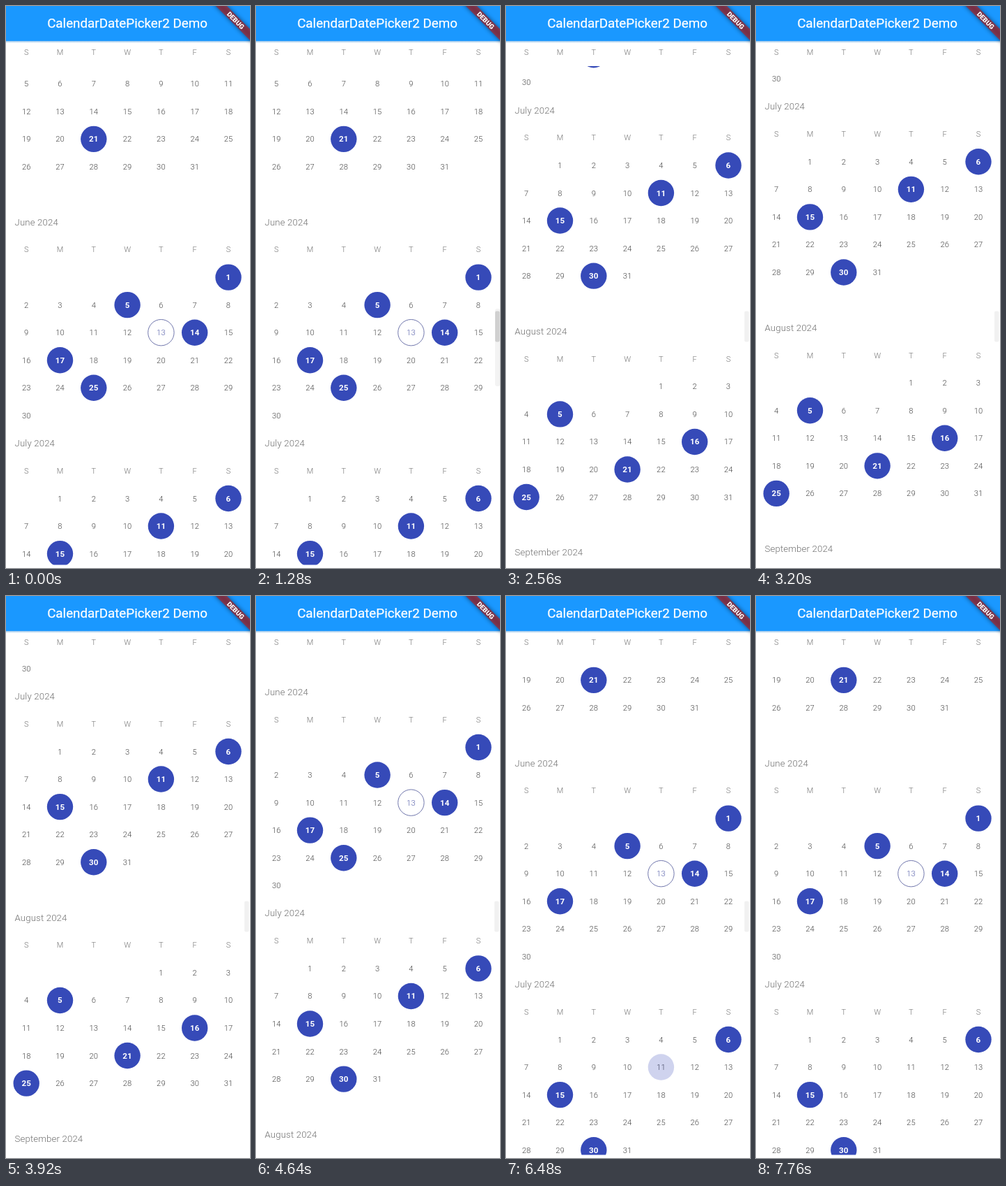
These frames come from a looping animation (350x804 px, 8000 ms). An HTML page:

```html
<!DOCTYPE html>
<html lang="en">
<head>
<meta charset="utf-8">
<title>Calendar</title>
<style>
  html, body { margin: 0; width: 100%; height: 100%; overflow: hidden; background: #fff; }
  svg { display: block; width: 100%; height: 100%; font-family: Roboto, sans-serif; }
  .title { font-size: 18.8px; fill: #fff; stroke: #fff; stroke-width: .25px; }
  .month { font-size: 13.2px; font-weight: 300; letter-spacing: .15px; fill: #707070; }
  .week { font-size: 11px; font-weight: 300; fill: #777; }
  .day text { font-size: 11.2px; font-weight: 300; letter-spacing: .1px; fill: #484848; }
  .day circle { fill: none; }
  .today circle { stroke: #7076ac; }
  .today text { fill: #5c65ad; }
  .on circle { fill: #364ab8; }
  .on text { font-size: 11.6px; font-weight: 700; fill: #fff; }
  .mid { text-anchor: middle; }
  .debug { font-size: 9.6px; font-weight: 900; fill: #fff; }
</style>
</head>
<body>
<svg viewBox="0 0 350 804" preserveAspectRatio="xMidYMid meet">
  <defs>
    <clipPath id="view"><rect y="86" width="350" height="713.5"/></clipPath>
    <linearGradient id="fade" x2="0" y2="1">
      <stop stop-color="#8fbfe8"/><stop offset="1" stop-color="#fff"/>
    </linearGradient>
    <filter id="soft" x="-20%" y="-150%" width="140%" height="400%"><feGaussianBlur stdDeviation="3"/></filter>
  </defs>
  <rect width="350" height="804" fill="#fff"/>
  <g clip-path="url(#view)"><g id="list"></g></g>
  <g id="sticky"></g>
  <g id="bar">
    <rect id="track" x="343" y="433" width="7" height="111" rx="3" fill="#f3f3f3"/>
    <rect id="thumb" x="342" y="436.5" width="6.5" height="44" rx="2" fill="#f1f1f1"/>
  </g>
  <rect y="50" width="350" height="3" fill="url(#fade)"/>
  <rect width="350" height="50" fill="#1a98ff"/>
  <text class="title mid" x="174" y="31.2">CalendarDatePicker2 Demo</text>
  <g transform="translate(350 0) rotate(45)">
    <rect x="-40" y="23.4" width="80" height="11.3" opacity=".5" filter="url(#soft)"/>
    <rect x="-40" y="23.4" width="80" height="11.3" fill="#b71c1c" fill-opacity=".627"/>
    <text class="debug mid" y="32.5">DEBUG</text>
  </g>
</svg>
<script>
const LOOP = 8000, STEP = 80;
const ROW = 39.55, COL = 48.3, LEFT = 29.2, RADIUS = 18.7;
const JUNE_Y = 309, REACH = 482, REST = 70;
const NAMES = { 4: 'May', 5: 'June', 6: 'July', 7: 'August', 8: 'September' };
const PICKED = { 4: [21], 5: [1, 5, 14, 17, 25], 6: [6, 11, 15, 30], 7: [5, 16, 21, 25], 8: [] };
const TODAY = '5-13';
const TAPS = [{ key: '5-25', at: 5760 }, { key: '6-11', at: 6400 }];

const $ = id => document.getElementById(id);
const list = $('list');
const cells = {};

function add(parent, tag, attrs, content) {
  const node = document.createElementNS('http://www.w3.org/2000/svg', tag);
  for (const k in attrs) node.setAttribute(k, attrs[k]);
  if (content !== undefined) node.textContent = content;
  return parent.appendChild(node);
}

const colX = c => LEFT + c * COL;

function weekRow(parent, y) {
  [...'SMTWTFS'].forEach((s, c) => add(parent, 'text', { class: 'week mid', x: colX(c), y: y + 3.9 }, s));
}

function dayCell(month, day, x, y) {
  const key = month + '-' + day;
  const on = PICKED[month].includes(day);
  const g = add(list, 'g', { class: 'day' + (on ? ' on' : '') + (key === TODAY ? ' today' : '') });
  add(g, 'circle', { cx: x, cy: y, r: RADIUS });
  add(g, 'text', { class: 'mid', x, y: y + 4 }, day);
  cells[key] = { g, x, y };
}

function buildMonth(month) {
  const top = JUNE_Y + (month - 5) * 8 * ROW;
  const first = new Date(2024, month, 1).getDay();
  const count = new Date(2024, month + 1, 0).getDate();
  add(list, 'text', { class: 'month', x: 12.5, y: top + 4.7 }, NAMES[month] + ' 2024');
  weekRow(list, top + ROW);
  for (let d = 1; d <= count; d++) {
    const slot = first + d - 1;
    dayCell(month, d, colX(slot % 7), top + (2 + Math.floor(slot / 7)) * ROW);
  }
}

Object.keys(NAMES).forEach(m => buildMonth(+m));
weekRow($('sticky'), 66);
for (const tap of TAPS) {
  const { x, y } = cells[tap.key];
  tap.splash = add(list, 'circle', { cx: x, cy: y, r: RADIUS, fill: '#364ab8', opacity: 0 });
}

const clamp = v => Math.max(0, Math.min(1, v));

// Damped settle from 0 to 1.
function settle(t, start, tau, order) {
  const u = Math.max(0, t - start) / tau;
  return 1 - (1 + u + (order > 2 ? u * u / 2 : 0)) * Math.exp(-u);
}

function scrollAt(t) {
  return REACH * settle(t, 1300, 194, 2) - (REACH - REST) * settle(t, 4364, 70, 3);
}

function draw(t) {
  list.setAttribute('transform', `translate(0 ${-scrollAt(t).toFixed(2)})`);
  for (const { key, at, splash } of TAPS) {
    cells[key].g.classList.toggle('on', t < at);
    splash.setAttribute('opacity', t < at ? 0 : .32 * (1 - clamp((t - at) / 320)));
  }
  const pressed = 1 - clamp((t - 1280) / 400);
  const shade = Math.round(241 - 33 * pressed);
  $('bar').setAttribute('opacity', t >= 1200 && t < 6960 ? 1 : 0);
  $('track').setAttribute('opacity', pressed);
  $('thumb').setAttribute('fill', `rgb(${shade},${shade},${shade})`);
  $('thumb').setAttribute('x', 342 + pressed);
}

const begin = performance.now();
function tick() {
  const t = (performance.now() - begin) % LOOP;
  draw(Math.floor(t / STEP) * STEP);
  requestAnimationFrame(tick);
}
draw(0);
tick();
</script>
</body>
</html>
```
